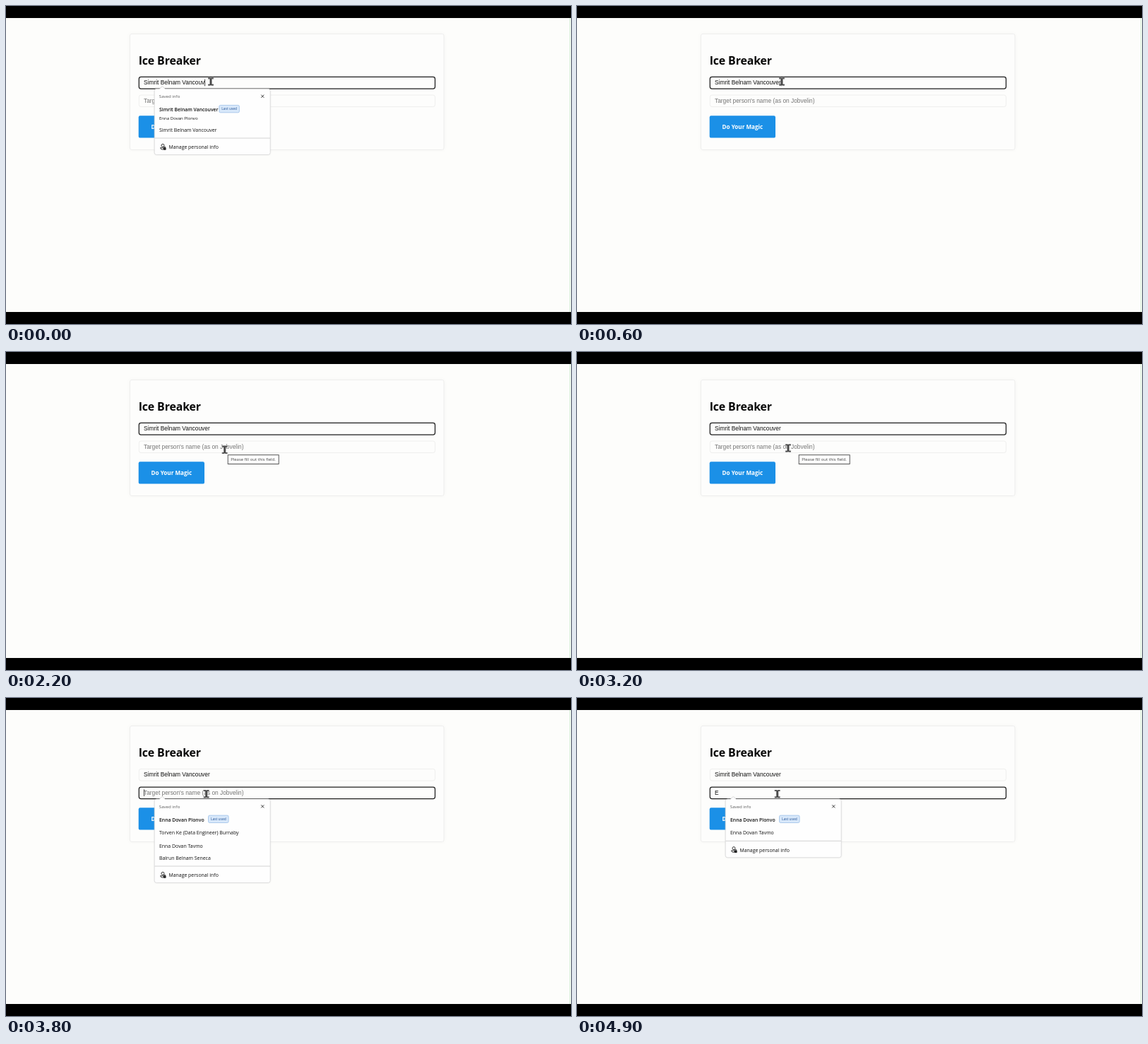
These frames come from a looping animation (800x450 px, 5000 ms). An HTML page:

```html
<!DOCTYPE html>
<html lang="en">
<head>
<meta charset="utf-8">
<title>Ice Breaker</title>
<style>
  html, body { margin: 0; width: 100%; height: 100%; overflow: hidden; background: #000; }
  svg { display: block; width: 800px; height: 450px; }
  text { font-family: "Open Sans", "Noto Sans", sans-serif; fill: #111; white-space: pre; }
  .field { font: 8.37px "Liberation Sans", Arial, sans-serif; fill: #111; }
  .hint { fill: #757575; }
  .box { fill: #fdfdfc; stroke: #efefee; stroke-width: 1; }
  .box.focus { stroke: #1c1c1c; stroke-width: 1.25; }
  .card { fill: #fdfdfc; stroke: #eeeeed; filter: drop-shadow(0 0 2px #00000008); }
  .panel { fill: #fefefe; stroke: #d6d6d6; stroke-width: .8; filter: drop-shadow(0 .5px 1px #00000010); }
  .line { fill: none; stroke: #222; stroke-width: .9; }
</style>
</head>
<body>
<svg viewBox="0 0 800 450">
  <rect width="800" height="450"/>
  <rect y="17" width="800" height="416" fill="#fdfdfb"/>
  <rect x="798" y="17" width="1" height="416" fill="#d4efd4"/>
  <rect class="card" x="175.5" y="39.5" width="444.5" height="164" rx="2.5"/>
  <text x="187.7" y="83" font-size="15.9" font-weight="700" letter-spacing="-.13" style="fill:#080808">Ice Breaker</text>

  <rect id="box1" class="box" x="188.3" y="100.4" width="419.2" height="16.6" rx="2.8"/>
  <text id="value1" class="field" x="195" y="111.2"></text>
  <rect id="box2" class="box" x="188.3" y="126" width="419.2" height="16.6" rx="2.8"/>
  <text id="value2" class="field" x="195" y="136.9"></text>
  <rect id="caret" width=".8" height="9.6" fill="#111"/>

  <rect x="187.7" y="155.2" width="93.3" height="31.4" rx="2.2" fill="#1b90e7"/>
  <text x="205.6" y="174.3" font-size="8.1" font-weight="700" style="fill:#fff">Do Your Magic</text>

  <g id="tip">
    <rect x="314.2" y="145.7" width="72" height="12.8" fill="#fefefe" stroke="#444" stroke-width=".9"/>
    <text x="318.2" y="154.3" font-size="5.94" style="fill:#444">Please fill out this field.</text>
  </g>
  <g id="popup"></g>
  <path id="mouse" d="M-4-5.8H-1L0-5.2 1-5.8H4V-3.6H1.6V3.6H4V5.8H1L0 5.2-1 5.8H-4V3.6H-1.6V-3.6H-4Z"
        fill="#484848" stroke="#fff" stroke-opacity=".7" stroke-width=".4"/>
</svg>
<script>
const $ = id => document.getElementById(id);
const LOOP = 5000, STEP = 100;
const NAME = 'Simrit Belnam Vancouver';
const HINT = "Target person's name (as on Jobvelin)";

const label = (x, y, size, text, extra = '') =>
  `<text x="${x}" y="${y}" font-size="${size}" ${extra}>${text}</text>`;

// Suggestion panel; rows are [y, text, size] below its top edge
function panel(top, first, badgeX, rows, rule) {
  const end = rule + 23.5;
  return `<g transform="translate(0 ${top})">
    <path class="panel" d="M213.2 0H217.2L221.3-3.4 225.4 0H371.2Q374.2 0 374.2 3V${end - 3}Q374.2 ${end} 371.2 ${end}H213.2Q210.2 ${end} 210.2 ${end - 3}V3Q210.2 0 213.2 0Z"/>
    ${label(216.8, 12.8, 6.1, 'Saved info', 'style="fill:#5c5c5c"')}
    <path class="line" d="M361.3 8.4l4 4m0-4l-4 4"/>
    ${label(217, 31.7, 6.85, first, 'font-weight="600"')}
    <rect x="${badgeX}" y="23.1" width="28.6" height="10.4" rx="1.8" fill="#d8e8fa" stroke="#92b9e6" stroke-width=".7"/>
    ${label(badgeX + 3.5, 30.2, 4.9, 'Last used', 'style="fill:#1f4f94"')}
    ${rows.map(([y, text, size = 6.95]) => label(217, y, size, text)).join('')}
    <path d="M210.5 ${rule}H374" stroke="#cfcfcf" stroke-width=".9"/>
    <g transform="translate(218 ${rule + 8})">
      <circle class="line" cx="4" cy="2.3" r="2"/>
      <path class="line" d="M4 8.2Q.6 8 .6 5.6H4.4"/>
      <rect x="4.4" y="5.2" width="4.2" height="3.6" rx=".7" fill="#222"/>
      <path class="line" d="M5.4 5.4V4.4H7.6V5.4"/>
    </g>
    ${label(230.4, rule + 15.2, 6.95, 'Manage personal info')}
  </g>`;
}

const LAST = 'Enna Dovan Plonvo', OTHER = 'Enna Dovan Tavmo';
const panels = {
  none: '',
  name: panel(117.3, NAME, 301.8,
    [[44.2, LAST, 6.05], [61.2, NAME]], 69.7),
  all: panel(143, LAST, 286.5,
    [[50.3, 'Torven Ke (Data Engineer) Burnaby'], [68.5, OTHER], [86, 'Balrun Belnam Seneca']], 95),
  match: panel(143, LAST, 286.5, [[50.3, OTHER]], 59.3)
};

// Pointer stops: [time, x, y]
const stops = [[0, 290, 107], [1000, 290, 107], [1400, 309.7, 138.3], [2900, 309.7, 138.3],
               [3200, 299, 136], [3500, 283.7, 135.7], [LOOP, 283.7, 135.7]];

function pointer(t) {
  const i = stops.findIndex(s => s[0] > t), [t0, x0, y0] = stops[i - 1], [t1, x1, y1] = stops[i];
  const p = (t - t0) / (t1 - t0), k = p * p * (3 - 2 * p);
  return [x0 + (x1 - x0) * k, y0 + (y1 - y0) * k];
}

const blinkOn = age => age % 1000 < 500;
const show = (id, on) => $(id).setAttribute('visibility', on ? 'visible' : 'hidden');
let shown;

function draw(t) {
  const second = t >= 3700, typed = t >= 4400;
  const value = NAME.slice(0, t < 200 ? -2 : t < 300 ? -1 : NAME.length);
  $('box1').classList.toggle('focus', !second);
  $('box2').classList.toggle('focus', second);
  $('value1').textContent = value;
  $('value2').textContent = typed ? 'E' : HINT;
  $('value2').classList.toggle('hint', !typed);

  const active = second ? $('value2') : $('value1');
  const width = second && !typed ? 0 : active.getComputedTextLength();
  const lastInput = typed ? 4400 : second ? 3700 : t < 300 ? 0 : 300;
  $('caret').setAttribute('x', 195 + width);
  $('caret').setAttribute('y', second ? 129.3 : 103.7);
  show('caret', blinkOn(t - lastInput));

  const kind = t < 400 ? 'name' : t < 3800 ? 'none' : t < 4500 ? 'all' : 'match';
  if (kind !== shown) $('popup').innerHTML = panels[shown = kind];
  show('tip', t >= 2000 && t < 3500);
  $('mouse').setAttribute('transform', `translate(${pointer(t)})`);
}

const start = performance.now();
function tick(now) {
  const t = Math.max(0, now - start) % LOOP;
  draw(Math.floor(t / STEP) * STEP);
  requestAnimationFrame(tick);
}
draw(0);
requestAnimationFrame(tick);
</script>
</body>
</html>
```
